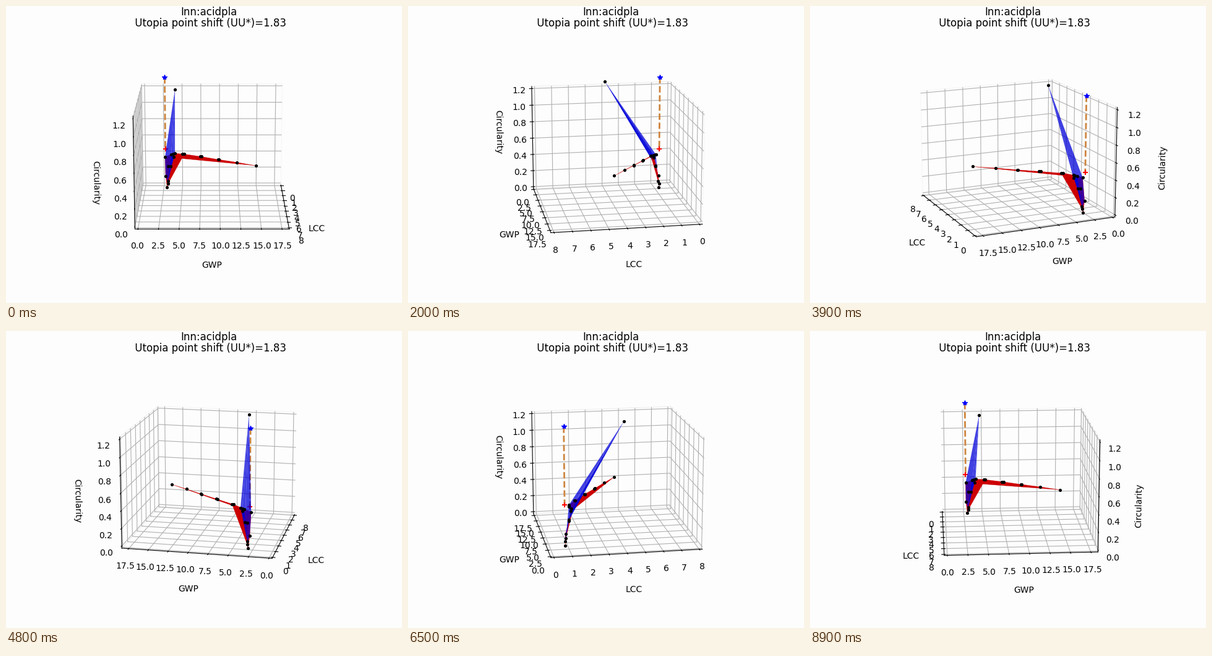
A matplotlib script that plays this animation: 640x480 px, repeating every 9000 ms.

```python
import matplotlib.pyplot as plt
from matplotlib.animation import FuncAnimation
from mpl_toolkits.mplot3d.art3d import Poly3DCollection

FRAMES, STEP = 90, 4
PAPER = "#fdfdfd"

# Solutions as (LCC, GWP, Circularity)
PTS = {
    "B": (4.17, 4.35, 1.342),
    "T": (4.42, 14.54, 0.474),
    "L1": (3.67, 12.18, 0.471),
    "L2": (2.92, 9.80, 0.464),
    "L2b": (2.95, 9.90, 0.464),
    "L3": (2.19, 7.44, 0.460),
    "L3b": (2.23, 7.62, 0.460),
    "L4": (1.49, 5.10, 0.453),
    "L4b": (1.53, 5.32, 0.453),
    "H": (1.12, 4.07, 0.440),
    "H1": (1.10, 3.85, 0.432),
    "H2": (1.07, 3.60, 0.426),
    "H3": (1.22, 3.91, 0.401),
    "P": (1.13, 2.75, 0.397),
    "M1": (1.04, 3.15, 0.280),
    "M2": (1.06, 3.48, 0.280),
    "N": (0.83, 2.78, 0.144),
    "K2": (0.86, 3.10, 0.081),
    "K1": (0.82, 3.10, 0.050),
    "K0": (0.81, 2.97, 0.004),
}
RED_DARK = ["T L1 L2 L3b L4b P", "L4b P K1", "L4b L4 H P"]
RED_LIGHT = ["H H2 P", "P N K1 M1", "N K1 K0"]
BLUE = ["B H H3", "B H3 M2", "B M2 P", "H H2 H3", "H2 M2 H3",
        "P M2 M1", "P M1 N", "M1 M2 K2", "M1 N K2",
        "K2 M2 H2", "K2 H2 H", "N K2 K1"]
IDEAL = (0.79, 2.78, 1.342)
SHIFTED = (0.79, 2.78, 0.476)

fig = plt.figure(figsize=(6.4, 4.8), dpi=100, facecolor=PAPER)
ax = fig.add_subplot(projection="3d", computed_zorder=False)
ax.set_facecolor(PAPER)
fig.text(328 / 640, 447 / 480, "Inn:acidpla\n Utopia point shift (UU*)=1.83",
         size=12, ha="center", va="baseline", linespacing=1.0)


def surface(faces, colors, width):
    verts = [[PTS[name] for name in face.split()] for face in faces]
    poly = Poly3DCollection(verts, facecolors=colors, edgecolors=colors,
                            linewidths=width)
    ax.add_collection3d(poly)
    return poly


red = surface(RED_DARK + RED_LIGHT,
              ["#cc0000"] * len(RED_DARK) + ["#e20000"] * len(RED_LIGHT), 0.2)
blue = surface(BLUE, [(0, 0, 0.85, 0.75)] * len(BLUE), 0)
red.set_zorder(4)

ax.plot(*zip(IDEAL, SHIFTED), "--", color="peru", lw=2, zorder=2)
ax.plot(*[[v] for v in IDEAL], "b*", ms=6, zorder=2.2)
ax.plot(*[[v] for v in SHIFTED], "r+", ms=6, mew=1.5, zorder=2.2)
ax.plot(*zip(*PTS.values()), "k.", ms=5.4, zorder=10)

ax.set_xlim(0, 8, view_margin=1 / 48)
ax.set_ylim(0, 18, view_margin=1 / 48)
ax.set_zlim(0, 1.2, view_margin=1 / 48)
ax.set_xlabel("LCC", labelpad=10)
ax.set_ylabel("GWP", labelpad=10)
ax.set_zlabel("Circularity", labelpad=10)
for axis in (ax.xaxis, ax.yaxis, ax.zaxis):
    axis.pane.set_fill(False)


def update(i):
    azim = i * STEP
    ax.view_init(elev=15, azim=azim)
    # The surface with the nearest corner goes on top
    red_first = 12 < azim < 145 or 195 < azim < 258
    blue.set_zorder(3 if red_first else 5)
    return []


anim = FuncAnimation(fig, update, frames=FRAMES, init_func=lambda: [],
                     interval=100, repeat=True, repeat_delay=0, blit=False)
plt.show()
```
